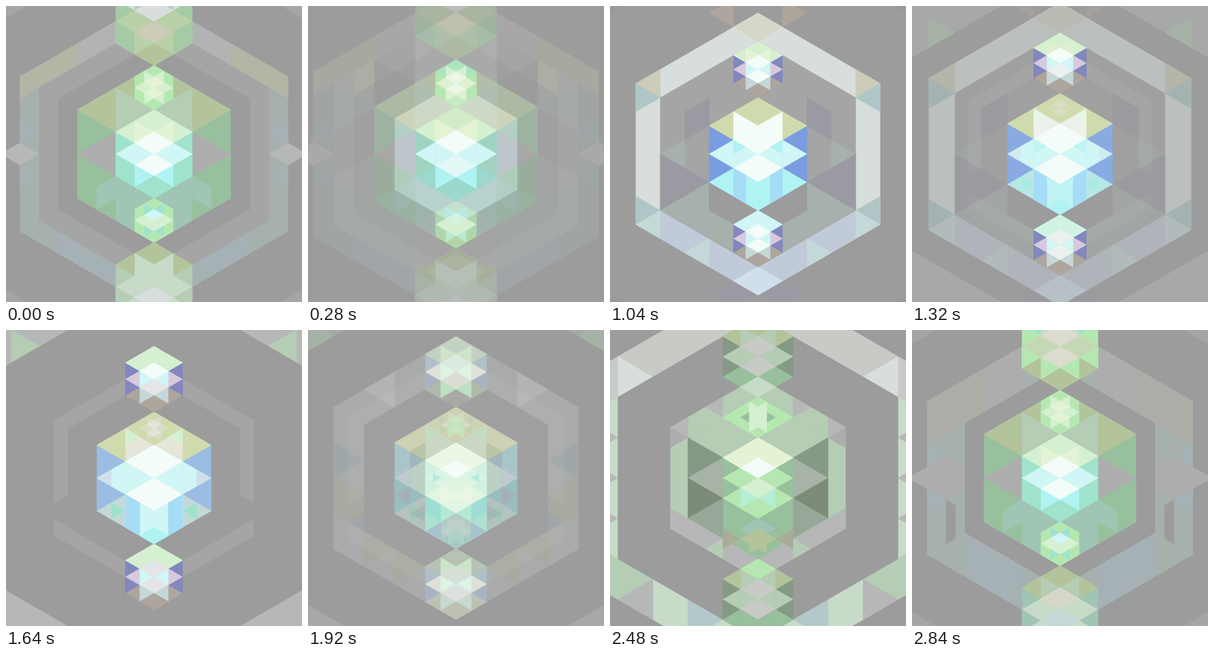
An HTML page that plays this animation: 500 px wide and 500 px high, repeating every 2880 ms.

```html
<!DOCTYPE html>
<html lang="en">
<head>
<meta charset="utf-8">
<title>Hexagon zoom</title>
<style>
html, body { margin: 0; width: 100%; height: 100%; overflow: hidden; background: #9c9c9c; }
svg { display: block; width: 100%; height: 100%; }
/* a hairline in the fill colour closes the seams between facets */
path { stroke-width: .5; stroke-linejoin: bevel; vector-effect: non-scaling-stroke; }
</style>
</head>
<body>
<svg id="stage" viewBox="0 0 500 500"></svg>
<script>
const LOOP = 2880, STEP = 40, UNIT = 32.35;

const bg = '#9c9c9c', pale = '#a5a5a5', ash = '#adadad', grey = '#b5b8b7', stone = '#c8cac5',
  fog = '#a6b0ac', haze = '#a5b1b5', slate = '#9b9aa3', khaki = '#b3b5a5', sand = '#ccccb8',
  clay = '#aea59d', olive = '#b3c49b', lime = '#d0dbad', moss = '#859a85', fern = '#98c09d',
  sage = '#b5ccb5', mist = '#c8dac8', pearl = '#d8dedb', mint = '#b5e8b0', leaf = '#d5f0d0',
  cream = '#e5f3d5', bone = '#e5e5d9', white = '#f3fcf8', ice = '#d0f6f5', aqua = '#b0f3f3',
  sea = '#a0e3cd', teal = '#a0c5b5', frost = '#c5d8d8', sky = '#d0e0eb', azure = '#a5dcf6',
  indigo = '#8287be', lilac = '#d8cadd';

let art = '';

// Lattice: x counts columns, y counts half triangle edges. Off-axis shapes are mirrored.
const put = (c, p) => { art += `<path fill="${c}" stroke="${c}" d="M${p.join(' ')}z"/>`; };
const poly = (c, ...p) => {
  put(c, p);
  put(c, p.map((v, i) => i % 2 ? v : -v));
};
const hex = (c, r, y = 0) =>
  put(c, [0, y - 2 * r, r, y - r, r, y + r, 0, y + 2 * r, -r, y + r, -r, y - r]);
const dia = (c, x, y, r) => poly(c, x - r, y, x, y - r, x + r, y, x, y + r);
const tri = (c, x, y, w) => poly(c, x, y - w, x, y + w, x + w, y);

// Part of a slanted hexagon edge between columns a and b; s is -1 above, 1 below.
const slat = (c, r, s, a, b, w = 1) =>
  poly(c, a, s * (2 * r - a), b, s * (2 * r - b), b, s * (2 * r - 2 * w - b), a, s * (2 * r - 2 * w - a));

// A faceted cube; every facet left out takes the colour of its neighbour.
function gem(y, r, { top, arm = top, side = top, point = arm, star = point, core = star,
  core2 = core, side2 = side, low = star, leg = side2, foot = leg }) {
  const h = r / 2;
  hex(side, r, y);
  dia(top, 0, y - r, r);
  tri(arm, h, y - r, -h);
  tri(side2, r, y + h, -h);
  tri(point, h, y, h);
  tri(star, h, y, -h);
  dia(core, 0, y - h, h);
  dia(core2, 0, y + h, h);
  tri(leg, h, y + r, h);
  tri(low, h, y + r, -h);
  dia(foot, 0, y + 1.5 * r, h);
}

function heart() {
  gem(0, 4, { top: olive, arm: sage, side: fern, point: ash, low: teal, leg: teal });
  tri(fern, 2, 5, 1);
  tri(fern, 3, 4, 1);
  gem(-6, 1, { top: mint, arm: leaf, core: cream });
  gem(6, 1, { top: mint, arm: sea, point: leaf, core: ice, core2: leaf, low: sea });
  gem(0, 2, { top: leaf, arm: cream, side: sea, point: ice, core: white, low: aqua, foot: sea });
}

function emerald() {
  hex(pale, 20);
  hex(bg, 10);
  hex(fog, 7);
  slat(khaki, 7, -1, 7, 4);
  slat('#b3b3b3', 7, -1, 4, 2);
  slat(haze, 7, 1, 5, 2);
  for (const s of [-1, 1]) tri(haze, 7, 2 * s, -1);
  dia(grey, 7, 0, 1);
  hex(pale, 6);
  hex(bg, 5);
  gem(-12, 2, { top: pearl, arm: sage, side: '#a5cba6', point: '#b9d0a8', core: pearl, core2: sand, foot: olive });
  gem(12, 2, { top: olive, arm: mist, side: sage, core2: pearl, leg: mist });
  heart();
}

function prism() {
  hex(pale, 6);
  tri(ash, 4, -6, 2);
  tri(khaki, 4, -7, 1);
  tri(khaki, 5, -6, -1);
  tri(fog, 6, -4, -2);
  tri(ash, 4, 2, 2);
  tri(fog, 6, 4, -2);
  tri(fog, 4, 6, 2);
  tri(bg, 4, -6, -2);
  slat(fog, 6, 1, 4, 2, 2);
  tri(ash, 2, 8, -2);
  dia(bg, 0, 10, 2);
  dia(pale, 0, 10, 1.5);
  dia(fog, 0, -10, 2);
  dia(khaki, 0, -11, 1);
  poly(grey, 2, -10, 0, -8, 0, -4, 2, -6);
  dia(fog, 2, -4, 2);
  tri(bg, 4, 2, -2);
  dia('#9aa6a5', 2, 4, 2);
  hex(sky, 3);
  dia(bone, 0, -3, 3);
  slat(frost, 3, 1, 3, 2);
  gem(0, 2, { top: leaf, arm: cream, side: teal, point: ice, core: white, core2: ice, low: aqua, leg: '#99d1cc' });
  dia('#cfe8c0', 0, -3, 1);
  gem(-6, 1, { top: sea, arm: leaf, side: mint, point: cream, core: white, foot: leaf });
  gem(6, 1, { top: sky, arm: ice, side: teal, point: leaf, leg: olive });
}

function sapphire() {
  hex('#999', 16);
  hex(bg, 8);
  tri(clay, 1, -10, 1);
  dia(slate, 1, 10, 1);
  hex(pearl, 5);
  tri(sand, 4, -5, 1);
  dia('#d5d8c8', 0, -9, 1);
  slat('#c0cad8', 5, 1, 5, 0);
  for (const y of [-4, 4]) tri('#aec6c6', 5, y, -1);
  tri(frost, 4, 5, 1);
  tri(frost, 2, 7, 1);
  dia(sky, 0, 9, 1);
  hex(pale, 4);
  slat(slate, 3, -1, 3, 2);
  tri(fog, 3, 0, 1);
  tri(slate, 4, 2, -2);
  tri(fog, 2, 4, 2);
  slat(fog, 4, 1, 2, 1);
  poly(bg, 0, 4, 2, 2, 2, 4, 1, 5);
  gem(0, 2, { top: lime, arm: white, side: '#7a9ce0', point: ice, core: white, low: aqua, leg: aqua });
  tri(aqua, 1, -.5, -.5);
  slat(azure, 2, 1, 1, .5);
  const ends = { side: indigo, point: lilac, star: ice, core: white, low: frost, leg: clay };
  gem(-6, 1, { ...ends, top: leaf, arm: cream });
  gem(6, 1, { ...ends, top: ice });
}

function twins() {
  hex(grey, 12);
  tri(sage, 5, -8, -1);
  hex(bg, 6);
  slat(pale, 3.5, -1, 3.5, 1, .5);
  poly(pale, 3.5, -3.5, 3.5, 1.5, 3, 1, 3, -3);
  slat(pale, 3.5, 1, 3.5, 1, .5);
  hex(bg, 3);
  gem(0, 2, { top: lime, arm: bone, side: '#9bbde3', point: ice, core: white, leg: frost, foot: ice });
  tri(leaf, 1, -2.5, -.5);
  tri(sky, 1.5, 0, .5);
  tri(sea, 1.5, 2, -.5);
  slat(azure, 2, 1, 1, .5);
  dia(aqua, 0, 3.5, .5);
  gem(-3, .5, { top: lime, arm: '#d8dcc8', core: bone });
  const ends = { top: leaf, side: indigo, point: lilac, star: ice, core2: '#e5e5e8', low: frost, leg: clay };
  gem(-6, 1, { ...ends, core: white });
  gem(6, 1, { ...ends, core: ends.core2 });
}

function jade() {
  hex(grey, 4);
  tri(stone, 2, -5, 1);
  tri(haze, 4, -1, -1);
  tri(khaki, 4, 1, -1);
  tri(khaki, 3, 2, 1);
  tri(haze, 3, 2.5, .5);
  for (const x of [3, 2]) tri(khaki, x, 7 - x, -1);
  hex(pale, 3);
  gem(-6, 1, { top: grey, arm: mist, side: leaf, point: cream, core: mist, core2: '#d5d8c5', side2: mist, low: mint, leg: sage, foot: fog });
  gem(6, 1, { top: bg, arm: mist, side: leaf, point: cream, core: mist, side2: mist, core2: pearl, low: mist });
  gem(0, 2, { top: sand, arm: sage, side: sage, point: grey, side2: fern, low: moss, leg: fog });
  slat('#a8b39b', 1.5, -1, 1.5, 1);
  poly('#a8b39b', 1.5, -1.5, 1, -2, 1, 1, 1.5, .5);
  tri(clay, 1.5, 1, .5);
  tri(bg, 1, 2, .5);
  gem(0, 1, { top: cream, arm: cream, side: leaf, core: white, core2: leaf });
  tri(sea, .75, 0, -.25);
  tri('#99e0b8', 1, 2, -1);
  tri(mint, 1, 2.5, -.5);
  gem(-3, .5, { top: sand, arm: '#d5d8c0', side: sage, star: mint, leg: sand });
  gem(3, .5, { top: '#9fa79a', arm: '#aeb5a8' });
}

function tower() {
  hex(mist, 5);
  slat(stone, 5, -1, 5, 0);
  tri(pearl, 4, -5, -1);
  for (const y of [-2, 0, 2]) tri(grey, 5, y, -1);
  slat(sage, 5, 1, 5, 3);
  tri(grey, 3, 6, 1);
  tri(mist, 2, 7, 1);
  tri('#b3c8c8', 2, 7, -1);
  hex(bg, 4);
  const ends = { arm: sage, side: moss, core: stone, low: fern, leg: fern };
  gem(-6, 1, { ...ends, top: olive, foot: sage });
  gem(6, 1, { ...ends, top: olive });
  dia(mint, 0, 4.5, .5);
  hex(sage, 2.5);
  slat(grey, 2.5, 1, 2.5, 0, .5);
  hex(fern, 2);
  dia(sage, 0, -3, 2);
  tri(grey, 2, -2.5, .5);
  tri(ash, 2.5, -2, -.5);
  dia(sage, 1, -2, 1);
  tri(moss, 2, -1, -1);
  tri('#a8b3a8', 1, 0, 1);
  tri('#7d8c78', 2, 1, -1);
  tri('#98a898', 1, 2, 1);
  slat(grey, 2.5, 1, 2, 0, .5);
  tri(sage, 1, 3.5, .5);
  dia(mint, 0, 4.5, .5);
  dia(mist, 0, -4.5, .5);
  tri(grey, 1, -3.5, .5);
  dia(mint, 0, -3, 1);
  gem(-3, .5, { top: mint, arm: leaf, point: fern, star: leaf });
  tri('#a8ad98', 1, 3, -.5);
  gem(3, .5, { top: teal, side: fern, point: olive });
  gem(0, 1, { top: cream, side: fern, point: mint, core: white, core2: leaf, low: '#b5eed5', leg: mint });
}

function dusk() {
  hex(pale, 20);
  hex(bg, 10);
  hex(fog, 7);
  slat('#adaca6', 7, -1, 7, 4, 2);
  slat(ash, 7, -1, 4, 2, 2);
  slat(haze, 7, 1, 5, 2, 2);
  for (const s of [-1, 1]) tri(haze, 7, 2 * s, -1);
  hex(ash, 1);
  dia(ash, 6, 0, 2);
  poly(bg, 6, 2, 5.5, 2.5, 5.5, 5.5, 6, 6);
  hex(bg, 5);
  gem(-12, 2, { top: sea, arm: mist, side: mint, point: '#c5d8b5', core: '#dcdccf', low: mint, leg: olive });
  gem(12, 2, { top: olive, arm: sage, side: teal, point: mist, core: '#d5d8c8', core2: frost, leg: mist });
  heart();
}

// One loop doubles the size, with a slight sway in speed.
const zoomAt = ms => {
  const p = ms / LOOP;
  return UNIT * 2 ** (p - .013 * Math.sin(2 * Math.PI * p));
};

// start time, scene, share of the current unit that its lattice uses
const keys = [
  [0, emerald, 1],
  [560, prism, 1],
  [1040, sapphire, 1],
  [1640, twins, 1],
  [2160, jade, 1],
  [2480, tower, 1],
  [2840, dusk, .5]
].map(([at, scene, share]) => {
  art = '';
  scene();
  return { at, share, art };
});

const stage = document.getElementById('stage');
stage.innerHTML = keys.map(k =>
  `<g><rect width="500" height="500" fill="${bg}"/><g>${k.art}</g></g>`).join('');
keys.forEach((k, i) => {
  k.layer = stage.children[i];
  k.body = k.layer.lastChild;
});

function draw(ms) {
  const t = Math.floor(ms % LOOP / STEP) * STEP;
  const i = Math.min(keys.findLastIndex(k => k.at <= t), keys.length - 2);
  const mix = (t - keys[i].at) / (keys[i + 1].at - keys[i].at);
  keys.forEach((k, n) => {
    const on = n === i || n === i + 1;
    k.layer.setAttribute('display', on ? 'inline' : 'none');
    if (!on) return;
    const s = zoomAt(t) * k.share;
    k.body.setAttribute('transform', `translate(250 250) scale(${s} ${s / Math.sqrt(3)})`);
    k.layer.setAttribute('opacity', n === i ? 1 : mix);
  });
}

const start = performance.now();
function tick() {
  draw(performance.now() - start);
  requestAnimationFrame(tick);
}
tick();
</script>
</body>
</html>
```
